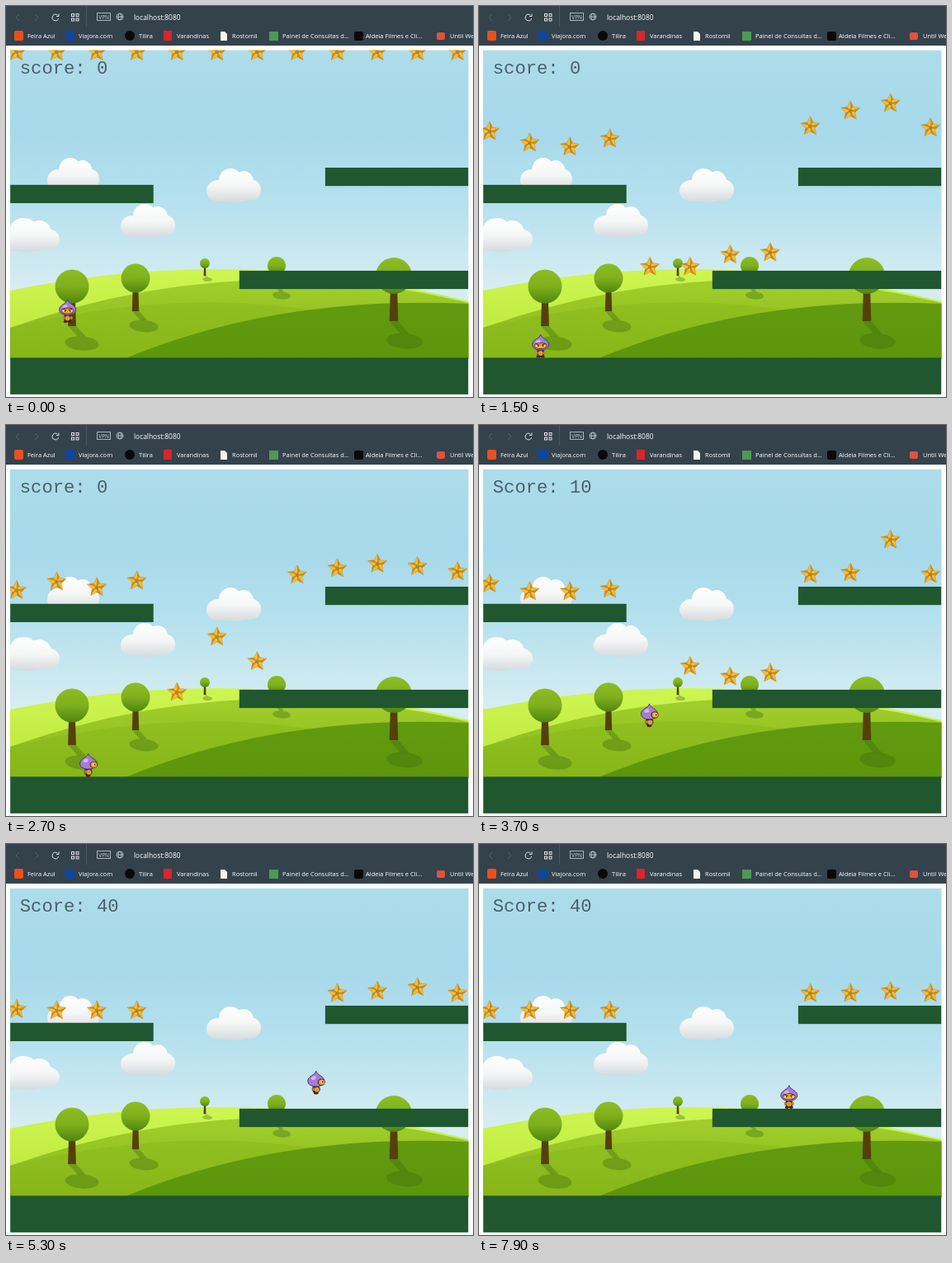
An HTML page with a canvas that plays this animation: 566 by 474 pixels, repeating every 8000 ms.

```html
<!DOCTYPE html>
<html lang="pt">
<head>
<meta charset="utf-8">
<title>Star game</title>
<style>
html, body { margin: 0; width: 566px; height: 474px; overflow: hidden; background: #fff; }
canvas { display: block; }
</style>
</head>
<body>
<canvas id="stage" width="566" height="474"></canvas>
<script>
const c = document.getElementById('stage').getContext('2d');
const TAU = Math.PI * 2, SCALE = 0.694, GRAVITY = 300;
const UI = '"Open Sans", "Noto Sans", sans-serif';
const sx = x => 5.2 + x * SCALE, sy = y => 54.4 + y * SCALE;

function rect(color, x, y, w, h) {
  c.fillStyle = color;
  c.fillRect(x, y, w, h);
}
function oval(color, x, y, rx, ry = rx, turn = 0) {
  c.fillStyle = color;
  c.beginPath();
  c.ellipse(x, y, rx, ry, turn, 0, TAU);
  c.fill();
}
function box(color, x, y, w, h, r = 2) {
  c.fillStyle = color;
  c.beginPath();
  c.roundRect(x, y, w, h, r);
  c.fill();
}
function shape(color, ...points) {
  c.fillStyle = color;
  c.beginPath();
  points.forEach(([x, y]) => c.lineTo(x, y));
  c.fill();
}
function line(color, width, ...points) {
  c.strokeStyle = color;
  c.lineWidth = width;
  c.beginPath();
  points.forEach(([x, y]) => c.lineTo(x, y));
  c.stroke();
}
function text(str, x, y, font, color) {
  c.font = font;
  c.fillStyle = color;
  c.fillText(str, x, y);
}
function fade(y0, y1, ...colors) {
  const g = c.createLinearGradient(0, y0, 0, y1);
  colors.forEach((color, i) => g.addColorStop(i / (colors.length - 1), color));
  return g;
}

// ---- browser bar ----
const bookmarks = [
  [26, 'Feira Azul'], [88, 'Viajora.com'], [161, 'Tilira'], [207, 'Varandinas'],
  [274, 'Rostomil'], [335, 'Painel de Consultas d...'], [436, 'Aldeia Filmes e Cli...'], [538, 'Until We']
];

function drawBar() {
  rect('#34424c', 0, 0, 566, 48);
  for (const [x, d] of [[14, -2], [37, 2]])
    line('#56636c', 1, [x - d, 10], [x + d, 14], [x - d, 18]);
  c.strokeStyle = '#dfe4e7';
  c.lineWidth = 1;
  c.beginPath();
  c.arc(60, 14, 3.8, 0.3, 5.4);
  c.stroke();
  line('#dfe4e7', 1, [64, 9.5], [64, 12.5], [61, 12.5]);
  for (const x of [79.5, 85]) for (const y of [9.5, 15]) c.strokeRect(x, y, 3, 3);
  rect('#4a5862', 97, 0, 1, 25);
  c.strokeStyle = '#a9b3b9';
  c.strokeRect(110.5, 8.5, 16, 9);
  text('VPN', 112.3, 15.6, '6.5px ' + UI, '#c5cdd2');
  c.strokeStyle = '#c5cdd2';
  c.lineWidth = 0.8;
  c.beginPath();
  c.ellipse(138, 13, 4, 4, 0, 0, TAU);
  c.ellipse(138, 13, 1.8, 4, 0, 0, TAU);
  c.moveTo(134, 13);
  c.lineTo(142, 13);
  c.stroke();
  text('localhost:8080', 155, 16.5, '8.4px ' + UI, '#fff');

  box('#e8501f', 10, 30, 11, 12);
  box('#0b469f', 72, 30, 11, 12);
  oval('#0a0a0a', 150, 36, 6);
  box('#d9252b', 191, 30, 10, 12, 0);
  shape('#f4f4f4', [260, 31], [265, 31], [268, 34], [268, 42], [260, 42]);
  box('#4c9a55', 319, 31, 11, 11, 0);
  box('#0a0a0a', 422, 31, 11, 11);
  box('#e2513b', 522, 32, 10, 9);
  for (const [x, name] of bookmarks) text(name, x, 38.7, '7.5px ' + UI, '#fff');
}

// ---- landscape ----
function cloud(x, y, w = 66) {
  const k = w / 66;
  c.fillStyle = fade(y, y + 42, '#ffffff', '#f5f6f6', '#d3d8db');
  c.beginPath();
  for (const [dx, dy, rx, ry] of [[14, 27, 14, 13], [29, 14, 14, 14], [45, 16, 12, 13],
    [53, 26, 13, 13], [33, 29, 24, 12]]) {
    c.moveTo(x + (dx + rx) * k, y + dy);
    c.ellipse(x + dx * k, y + dy, rx * k, ry, 0, 0, TAU);
  }
  c.fill();
}
function hill(top, bottom, x0, y0, cx, cy, x1, y1) {
  c.fillStyle = fade(Math.min(y0, y1) - 20, 427, top, bottom);
  c.beginPath();
  c.moveTo(x0, y0);
  c.quadraticCurveTo(cx, cy, x1, y1);
  c.lineTo(x1, 428);
  c.lineTo(x0, 428);
  c.fill();
}
function tree(x, y, r, foot, shadowX, shadowY) {
  const shade = 'rgba(60,105,15,.36)', w = r * 0.24, top = shadowY - r * 0.4;
  oval(shade, shadowX, shadowY, r, r * 0.42, 0.08);
  shape(shade, [x - w, foot], [x + w, foot], [shadowX + w, top], [shadowX - w, top]);
  shape('#55400c', [x - w * 0.7, y], [x + w * 0.7, y], [x + w, foot], [x - w, foot]);
  oval(fade(y - r, y + r, '#8cbd24', '#7fb01c', '#4f8510'), x, y, r);
}
function drawScene() {
  rect(fade(54, 340, '#addcea', '#a6d9ea', '#b7e1ee', '#d6edf1'), 5, 53.5, 556, 418);
  cloud(50, 184, 63);
  cloud(243, 197);
  cloud(139, 240);
  cloud(-13, 257, 78);
  hill('#cdf550', '#b9e63a', 5, 345, 283, 287, 561, 358);
  hill('#a0cd2a', '#84b51a', 5, 390, 283, 291, 561, 360);
  hill('#90c020', '#86b618', 5, 390, 230, 335, 420, 378);
  hill('#639c11', '#5c960b', 145, 427, 330, 350, 561, 361);
  tree(80, 340, 20.5, 388, 92, 409);
  tree(157, 330, 17.5, 370, 167, 388);
  tree(241, 312, 6, 327, 244, 331.5);
  tree(328, 315, 11, 338, 334, 351);
  tree(470, 327, 22, 382, 483, 406);
  for (const [x, y, w, h] of [[0, 536, 800, 64], [400, 384, 400, 32], [0, 234, 250, 32], [550, 204, 250, 32]])
    rect('#20572e', sx(x), sy(y), w * SCALE, h * SCALE);
}

// ---- physics ----
// Height above rest for a body whose apex is at t = 0; negative t is the rise.
function drop(t, height, bounce) {
  const fall = Math.sqrt(2 * height / GRAVITY);
  if (t < fall) return height - GRAVITY / 2 * t * t;
  t -= fall;
  let v = GRAVITY * fall * bounce;
  while (v > 4 && t > 2 * v / GRAVITY) {
    t -= 2 * v / GRAVITY;
    v *= bounce;
  }
  return v > 4 ? v * t - GRAVITY / 2 * t * t : 0;
}
const bounces = [.675, .534, .484, .583, .495, .682, .445, .708, .538, .707, .789, .52];
const rests = [212, 212, 212, 212, 514, 514, 362, 362, 182, 182, 182, 182];
const taken = { 4: 3.46, 5: 3.9, 6: 4.32, 7: 4.98 };
const LEAD = 0.085;

const walk = [[0, 100], [2.47, 100], [2.7, 136], [3.7, 290], [4.5, 425], [5.18, 534], [8, 534]];
function playerX(t) {
  const i = walk.findIndex(k => k[0] > t), [t0, x0] = walk[i - 1], [t1, x1] = walk[i];
  return x0 + (x1 - x0) * (t - t0) / (t1 - t0);
}
function playerY(t) {
  if (t < 3.394) return 512 - drop(t + LEAD, 62, 0.2);
  return t < 5.22 ? 360 - drop(t - 4.494, 29.5, 0.2) : 360 - drop(t - 6.32, 181.5, 0.2);
}

// ---- sprites ----
function drawStar(x, y) {
  const point = i => {
    const r = i % 2 ? 6 : 12.2, a = i * TAU / 10 - TAU / 4;
    return [x + r * Math.cos(a), y + 0.5 + r * Math.sin(a)];
  };
  for (let i = 0; i < 10; i++)
    shape(i % 2 ? '#f8bf2c' : '#d08c16', [x, y], point(i), point(i + 1));
  line('rgba(176,112,14,.6)', 0.6, ...Array.from({ length: 11 }, (_, i) => point(i)));
  oval('rgba(130,75,5,.45)', x, y + 0.5, 2.4);
}
function drawPlayer(x, y, right, step) {
  c.save();
  c.translate(x, y);
  const stride = right ? [2.5, 0.5, -2.5, 0.5][step] : 2.5;
  oval('#4b2a12', -stride, -1.5, 2.6, 1.7);
  oval('#4b2a12', stride, -1.5, 2.6, 1.7);
  oval('#3d2417', 0, -6, 5, 4.6);
  oval('#e09a35', right ? 1 : 0, -5.5, 3, 3);
  oval('#c7802a', right ? -3 : -4.5, -6, 1.6, 2);
  if (!right) oval('#c7802a', 4.5, -6, 1.6, 2);
  c.fillStyle = '#a77bdc';
  c.strokeStyle = '#4d3470';
  c.lineWidth = 1;
  c.beginPath();
  c.moveTo(0, -28);
  c.bezierCurveTo(1, -23, 10, -22, 10, -16);
  c.bezierCurveTo(10, -7, -10, -7, -10, -16);
  c.bezierCurveTo(-10, -22, -1, -23, 0, -28);
  c.fill();
  c.stroke();
  oval('#d3b5f3', -3, -19.5, 3, 2.2, -0.4);
  if (right) {
    oval('#5a2c16', 6.5, -14.5, 4.6, 4.2);
    oval('#eda233', 6.8, -14.5, 3.6, 3.3);
    oval('#fff3bd', 7.5, -15, 1.7, 1.5);
    oval('#3a1b10', 8, -14.8, 0.9, 1.1);
  } else {
    oval('#5a2c16', 0, -14.5, 8, 4);
    oval('#eda233', 0, -14.5, 7.2, 3.2);
    for (const side of [-1, 1]) {
      oval('#fff3bd', side * 3.3, -14.3, 2, 1.5);
      oval('#3a1b10', side * 3, -14.2, 0.9, 1.1);
      line('#3a1b10', 1, [side * 1.2, -15.2], [side * 5.5, -17]);
    }
  }
  c.restore();
}

function draw(t) {
  rect('#fff', 0, 0, 566, 474);
  drawBar();
  c.save();
  c.beginPath();
  c.rect(5, 53.5, 555.5, 417.5);
  c.clip();
  drawScene();
  drawPlayer(sx(playerX(t)), sy(playerY(t) + 24), t > 2.47 && t < 6.9, Math.floor(t * 10 + 0.01) % 4);
  bounces.forEach((b, i) => {
    if (t < (taken[i] ?? 9)) drawStar(sx(11 + 70 * i), sy(rests[i] - drop(t + LEAD, rests[i], b)));
  });
  const score = 10 * Object.values(taken).filter(at => t >= at).length;
  text((score ? 'Score: ' : 'score: ') + score, 16.8, 82,
    '22.2px "Liberation Mono", "Courier New", monospace', '#4c6069');
  c.restore();
}

const start = performance.now();
function tick() {
  const ms = (performance.now() - start) % 8000;
  draw(Math.floor(ms / 100) / 10);
  requestAnimationFrame(tick);
}
tick();
</script>
</body>
</html>
```
